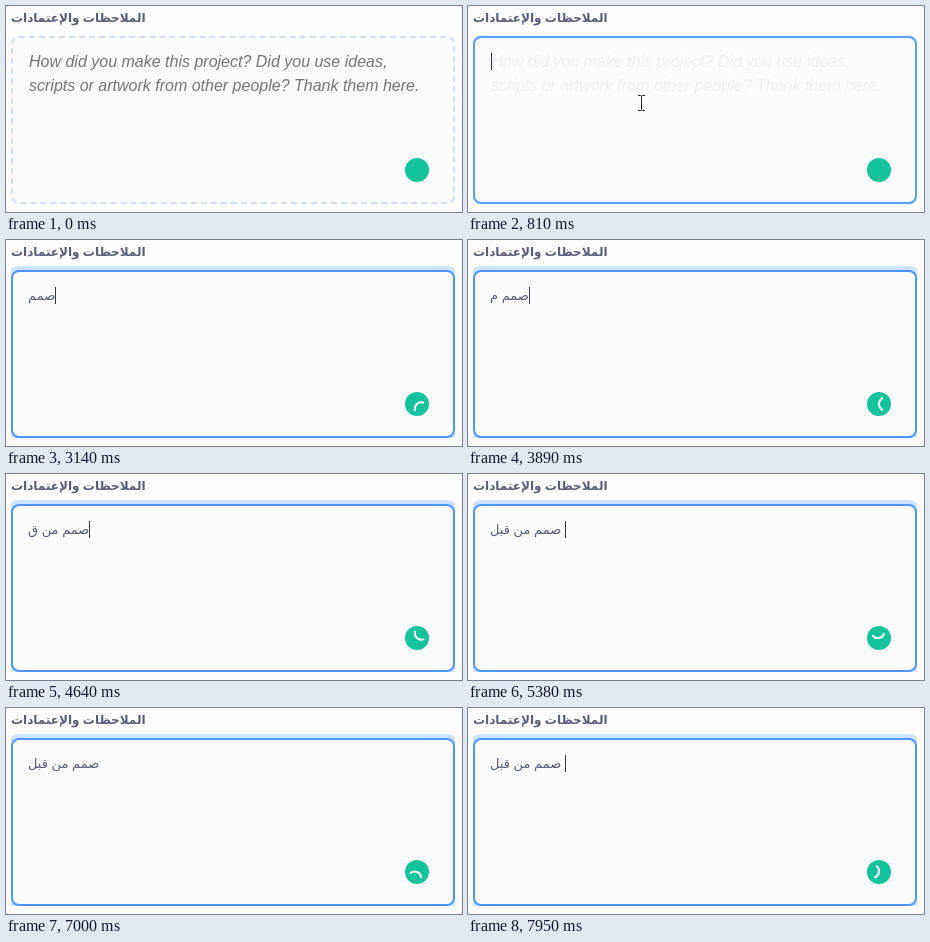
These frames come from a looping animation (456x206 px, 8 s). An HTML page:

```html
<!DOCTYPE html>
<html lang="ar">
<head>
<meta charset="utf-8">
<style>
html, body { margin: 0; width: 456px; height: 206px; overflow: hidden; background: #fcfcfc; }
body { position: relative; font-family: "Liberation Sans", "DejaVu Sans", sans-serif; color: #575e75; }
.clip { position: absolute; left: 5px; top: 0; width: 444px; height: 198px; overflow: hidden; }
#box { position: absolute; left: 0; top: 30px; width: 444px; height: 168px; box-sizing: border-box;
  border: 2px dashed #cfe0fb; border-radius: 8px; background: #fafafa; }
svg { position: absolute; left: 0; top: 0; }
text { white-space: pre; }
</style>
</head>
<body>
<div class="clip"><div id="box"></div></div>
<svg width="456" height="206" viewBox="0 0 456 206">
  <text x="5" y="16" font-size="12" font-weight="700" fill="#575e75">الملاحظات والإعتمادات</text>
  <g id="hint" font-size="16" font-style="italic" fill="#757575">
    <text x="23" y="61">How did you make this project? Did you use ideas,</text>
    <text x="23" y="85">scripts or artwork from other people? Thank them here.</text>
  </g>
  <text id="typed" x="22" y="60" font-size="13" fill="#575e75"></text>
  <rect id="caret" y="47" width="1" height="17" fill="#30343f"/>
  <path id="mouse" d="M-3.5 -7.5H-1Q0 -7.5 0 -6.5Q0 -7.5 1 -7.5H3.5M0 -6.5V6.5M-3.5 7.5H-1Q0 7.5 0 6.5Q0 7.5 1 7.5H3.5" fill="none" stroke="#222"/>
  <circle cx="411" cy="164" r="12" fill="#15c39a"/>
  <path id="spin" d="M-3.25 -5.63A6.5 6.5 0 0 1 -3.25 5.63" transform="translate(411 164)" fill="none" stroke="#fff" stroke-width="2" stroke-linecap="round"/>
</svg>
<script>
const LOOP = 8000, FOCUS = 610, BLINK = 535;
const PHRASE = "صمم من قبل ";
const KEYS = [2500, 2830, 3100, 3480, 3750, 4030, 4300, 4510, 4710, 4900, 5110];
const TURNS = [[2760, -290], [3890, 180], [5380, 800], [7000, 1370], [8000, 1830]];
const $ = id => document.getElementById(id);
const box = $("box"), hint = $("hint"), typed = $("typed"), caret = $("caret"), mouse = $("mouse"), spin = $("spin");

const ramp = (t, a, b) => Math.min(1, Math.max(0, (t - a) / (b - a)));
const easeOut = p => 1 - (1 - p) ** 2;
const mix = (a, b, p) => a.map((v, i) => Math.round(v + (b[i] - v) * p));
const show = (el, on) => el.setAttribute("visibility", on ? "visible" : "hidden");

function keyed(keys, t) {
  let i = 0;
  while (i < keys.length - 2 && t >= keys[i + 1][0]) i++;
  const [a, b] = [keys[i], keys[i + 1]];
  return a[1] + (b[1] - a[1]) * ramp(t, a[0], b[0]);
}

function caretOn(t) {
  if (t < FOCUS + 70) return false;
  if (t < KEYS[0]) return Math.floor((t - 700) / 533) % 2 === 0;
  return t < 5290 || Math.floor((t - 5290) / BLINK) % 2 === 0 || t > 7400;
}

function draw(t) {
  const focused = t >= FOCUS;
  const rgb = mix([207, 224, 251], [76, 151, 255], easeOut(ramp(t, FOCUS, 900)));
  box.style.borderStyle = focused ? "solid" : "dashed";
  box.style.borderColor = `rgb(${rgb})`;
  box.style.boxShadow = `0 0 0 ${4 * ramp(t, 800, 1000)}px rgba(76,151,255,.25)`;
  hint.setAttribute("opacity", 1 - easeOut(ramp(t, FOCUS, 900)));

  const count = KEYS.filter(k => t >= k).length;
  typed.textContent = PHRASE.slice(0, count);
  caret.setAttribute("x", count ? Math.round(22 + typed.getComputedTextLength()) : 23);
  show(caret, caretOn(t));

  const slide = ramp(t, 1090, 1220);
  mouse.setAttribute("transform", `translate(${173.5 + 15 * slide} ${97 + 60 * slide})`);
  show(mouse, t >= 400 && t < 1220);

  show(spin, t >= 2760);
  spin.setAttribute("transform", `translate(411 164) rotate(${keyed(TURNS, t)})`);
}

function frame(now) {
  draw(now % LOOP);
  requestAnimationFrame(frame);
}
draw(0);
requestAnimationFrame(frame);
</script>
</body>
</html>
```
